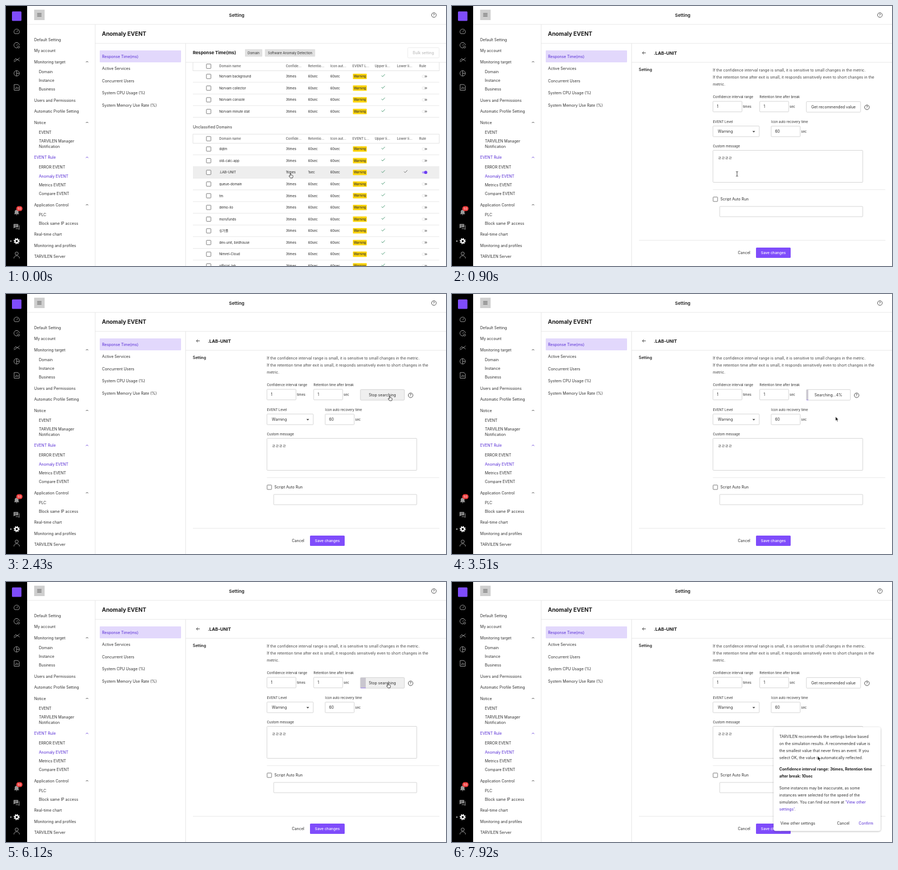
Recreate the animation shown at these times as an HTML page. Size 812 by 480 pixels, loop 8 s.

```html
<!DOCTYPE html>
<html lang="en">
<head>
<meta charset="utf-8">
<title>Setting</title>
<style>
html, body { margin: 0; width: 100%; height: 100%; overflow: hidden; background: #fff; }
svg { display: block; font-family: Inter, "Noto Sans CJK KR", "Noto Sans CJK", sans-serif; }
</style>
</head>
<body>
<svg id="stage" width="812" height="480" viewBox="0 0 812 480"></svg>
<script>
const LOOP = 8000;
const INK = '#303030', VIOLET = '#5429d4', ACCENT = '#7f4cfb', RULE = '#e2e2e2', EDGE = '#cacaca';
const BODY = 7.07, SMALL = 6.08, HEAD = 8.2;

// y is the middle of the capitals
const text = (x, y, s, o = {}) => {
  const size = o.size || BODY;
  return `<text x="${x}" y="${(y + size * 0.36).toFixed(2)}" font-size="${size}" fill="${o.fill || INK}"` +
    ` font-weight="${o.weight || 400}" text-anchor="${o.anchor || 'start'}"${o.id ? ` id="${o.id}"` : ''}>${s}</text>`;
};
const rect = (x, y, w, h, fill, extra = '') =>
  `<rect x="${x}" y="${y}" width="${w}" height="${h}" fill="${fill}" ${extra}/>`;
const frame = (x, y, w, h, stroke = EDGE, r = 1) =>
  rect(x, y, w, h, '#fff', `stroke="${stroke}" stroke-width=".8" rx="${r}"`);
const path = (d, stroke, w = 1, extra = '') =>
  `<path d="${d}" fill="none" stroke="${stroke}" stroke-width="${w}" ${extra}/>`;
const rule = (x, y, w) => rect(x, y - 0.4, w, 0.8, RULE);
const box = (x, y) => rect(x - 4.1, y - 4.1, 8.2, 8.2, '#fff', 'stroke="#6c6c6c" stroke-width=".9" rx=".8"');
const help = (x, y) =>
  `<circle cx="${x}" cy="${y}" r="4.3" fill="none" stroke="#3c3c3c" stroke-width=".9"/>` +
  text(x, y, '?', { size: 6.2, anchor: 'middle', weight: 500 });

function rail() {
  const g = '#9a9a9a';
  return rect(0, 0, 39, 480, '#000') + rect(11, 10, 17.5, 17.5, ACCENT, 'rx="1.5"') +
    path('M16 51a5 5 0 1 1 7.4 0zM19.7 48l2.3-3', g) +
    path('M21 77.2a5 5 0 1 1 3.6-5M19.5 73l2-2.5', g) +
    `<circle cx="23.2" cy="75.8" r="1.8" fill="none" stroke="${g}"/>` +
    path('M14.5 101l3.5-4 3 2.5 4-4M14.5 103l4-2 2.5-3 4 4', g) +
    `<circle cx="19.7" cy="124.3" r="5" fill="none" stroke="${g}"/>` + path('M19.7 119.3v10M19.7 124.3h5', g) +
    path('M15 145h7l2.5 2.5v8H15zM17.5 153v-2M19.7 153v-4M22 153v-3', g) +
    `<path d="M14.8 384.2l1.3-1.8v-2.6a3.5 3.5 0 0 1 7 0v2.6l1.3 1.8zM18.3 385h2.7a1.4 1.4 0 0 1-2.7 0z" fill="${g}"/>` +
    rect(19, 369.5, 11.5, 9, '#ee3d3d', 'rx="4.5"') +
    text(24.8, 374, '50', { size: 5.3, fill: '#fff', anchor: 'middle' }) +
    `<path d="M14 402.5h8.5v6H17l-3 2z" fill="${g}"/>` + path('M24.3 405v7.5l-2-1.5h-4.5', g) +
    path('M15.5 404.6h5.5M15.5 406.5h4', '#000', 0.6) +
    '<circle cx="9" cy="434" r="1.1" fill="#fff"/><circle cx="19.7" cy="434" r="3.1" fill="none" stroke="#fff" stroke-width="2.2"/>' +
    '<circle cx="19.7" cy="434" r="4.8" fill="none" stroke="#fff" stroke-width="1.7" stroke-dasharray="1.9 1.87"/>' +
    `<circle cx="19.7" cy="457" r="2.9" fill="none" stroke="${g}"/>` + path('M14.6 466c0-3.5 2.5-5 5.1-5s5.1 1.5 5.1 5', g);
}

// label, middle, level (0 top, 1 child, 2 open parent), coloured
const MENU = [
  ['Default Setting', 62, 0], ['My account', 82.5, 0], ['Monitoring target', 103, 2], ['Domain', 121.2, 1],
  ['Instance', 137.5, 1], ['Business', 153.5, 1], ['Users and Permissions', 174, 0],
  ['Automatic Profile Setting', 194.5, 0], ['Notice', 215, 2], ['EVENT', 233.2, 1],
  ['TARVILEN Manager', 249.4, 1], ['Notification', 259, 1], ['EVENT Rule', 279.5, 2, 1],
  ['ERROR EVENT', 297.7, 1], ['Anomaly EVENT', 314, 1, 1], ['Metrics EVENT', 330.2, 1],
  ['Compare EVENT', 346.5, 1], ['Application Control', 367, 2], ['PLC', 385, 1],
  ['Block same IP access', 401.2, 1], ['Real-time chart', 421.7, 0],
  ['Monitoring and profiles', 442.2, 0], ['TARVILEN Server', 462.6, 0]
];

function shell() {
  let s = rail() + rect(52, 6.8, 19.3, 19.2, '#cfcfcf') +
    path('M57.5 13.8h8M57.5 16.4h8M57.5 19h8', '#444', 0.9) +
    text(425.7, 16.7, 'Setting', { size: HEAD, weight: 600, anchor: 'middle', fill: '#1c1c1c' }) + help(789.7, 16.7) +
    rule(39, 34, 773) + rect(164, 34, 0.8, 446, RULE) + rule(164, 69, 648) + rect(331, 69, 0.8, 411, RULE) +
    text(177, 51.5, 'Anomaly EVENT', { size: 10.25, weight: 700, fill: '#1c1c1c' });
  for (const [label, y, level, on] of MENU) {
    const fill = on ? VIOLET : INK;
    s += text(level === 1 ? 60.7 : 52, y, label, { fill });
    if (level === 2) s += path(`M147.6 ${y + 1}l2-2 2 2`, fill, 0.9);
  }
  s += rect(173, 82, 150, 22, '#e2d8fc', 'rx="1"');
  ['Response Time(ms)', 'Active Services', 'Concurrent Users', 'System CPU Usage (%)', 'System Memory Use Rate (%)']
    .forEach((label, i) => { s += text(177.3, 93.3 + i * 22.5, label, { size: 7.12, fill: i ? INK : VIOLET }); });
  return s;
}

const COLS = [393.5, 516.4, 557.4, 598.5, 639.3, 680.4, 721.4, 762.6];
const TITLES = ['Domain name', 'Confide...', 'Retentio...', 'Icon aut...', 'EVENT L...', 'Upper li...', 'Lower li...', 'Rule'];
const tick = (x, y, c) => path(`M${x - 3} ${y - 0.8}l2 2.1 4.2-4.4`, c, 1);

function tableHead(y) {
  return frame(345, y - 8.3, 454.5, 16.6, '#dcdcdc', 0) + box(374, y) +
    TITLES.map((t, i) => text(COLS[i], y, t, { size: SMALL, weight: 600, fill: '#707070' })).join('');
}

function tableRow(name, y) {
  const on = name === '.LAB-UNIT';
  let s = (on ? rect(345, y - 10.8, 454.5, 21.5, '#eeeeee') : '') + rule(345, y + 10.8, 454.5) + box(374, y);
  [name, on ? '1times' : '3times', on ? '1sec' : '60sec', '60sec']
    .forEach((v, i) => { s += text(COLS[i], y, v, { size: SMALL, fill: '#262626' }); });
  s += rect(640.2, y - 5, 25.6, 10, '#ffd60d', 'rx="1"') +
    text(653, y, 'Warning', { size: 5.7, anchor: 'middle', weight: 500 }) + tick(696, y - 0.8, '#4a9a74');
  if (on) {
    s += tick(737.5, y - 0.8, '#6c6c6c') + rect(767.8, y - 2, 9, 4, '#b79cff', 'rx="2"') +
      `<circle cx="774.6" cy="${y}" r="2.9" fill="#6a3df0"/>`;
  } else {
    s += rect(768.5, y - 1.8, 8.8, 3.6, '#a8a8a8', 'rx="1.8"') +
      `<circle cx="770.4" cy="${y}" r="2.5" fill="#fff" stroke="#d0d0d0" stroke-width=".5"/>`;
  }
  return s;
}

function listView() {
  const step = 21.58;
  let s = tableHead(111.2);
  ['background', 'collector', 'console', 'minute stat']
    .forEach((n, i) => { s += tableRow('Norvam ' + n, 130 + i * step); });
  s += text(345, 223.3, 'Unclassified Domains') + tableHead(245);
  ['dqtm', 'old-calc-app', '.LAB-UNIT', 'queue-domain', 'tm', 'demo-lio', 'morufunds', '싱가폴',
    'dev-unit, birdhouse', 'Nimrel-Cloud', 'official-lab']
    .forEach((n, i) => { s += tableRow(n, 264 + i * step); });
  return s + rect(332, 70, 480, 34, '#fff') + rule(331, 104, 481) +
    text(344.7, 86.5, 'Response Time(ms)', { size: HEAD, weight: 700, fill: '#1c1c1c' }) +
    rect(441, 79.8, 32, 13.6, '#e0e0e0', 'rx="1"') + text(457, 86.6, 'Domain', { size: SMALL, anchor: 'middle' }) +
    rect(477.8, 79.8, 92.7, 13.6, '#e0e0e0', 'rx="1"') +
    text(524.2, 86.6, 'Software Anomaly Detection', { size: SMALL, anchor: 'middle' }) +
    frame(741.3, 76.8, 58, 19, '#e6e6e6', 2) + text(770.3, 86.5, 'Bulk setting', { anchor: 'middle', fill: '#b4b4b4' });
}

function field(x, y, value, unit) {
  return frame(x, y, 53.5, 19.4) + text(x + 7.2, y + 9.7, value) + text(x + 55.3, y + 10, unit, { size: SMALL });
}

function formView() {
  const label = (x, y, s) => text(x, y, s, { size: SMALL });
  return rule(331, 104, 481) + path('M357.6 86.6h-6M354 83.9l-2.7 2.7 2.7 2.7', '#333', 0.9) +
    text(372.6, 86.6, '.LAB-UNIT', { size: HEAD, weight: 700, fill: '#1c1c1c' }) +
    text(344.8, 117, 'Setting', { weight: 600, fill: '#1c1c1c' }) +
    ['If the confidence interval range is small, it is sensitive to small changes in the metric.',
      'If the retention time after exit is small, it responds sensitively even to short changes in the', 'metric.']
      .map((s, i) => text(481.3, 118.8 + i * 12.9, s, { fill: '#464646' })).join('') +
    label(481.4, 168, 'Confidence interval range') + label(567.6, 168, 'Retention time after break') +
    field(481.6, 176, '1', 'times') + field(567.8, 176, '1', 'sec') +
    `<rect id="btn" x="654" y="176.4" height="19.6" rx="1.5" stroke="${EDGE}" stroke-width=".8"/>` +
    `<rect id="bar" x="654.2" y="176.8" height="18.8" fill="#c9c6cf"/><rect id="barLine" x="654.2" y="195.2" height=".9" fill="#9b7cf5"/>` +
    text(0, 186.2, '', { id: 'btnText', anchor: 'middle' }) + `<g id="tip">${help(0, 187)}</g>` +
    label(481.4, 213.8, 'EVENT Level') + label(589, 213.8, 'Icon auto recovery time') +
    frame(481.6, 221.6, 85.4, 19.6) + text(490.6, 231.8, 'Warning') + '<path d="M554.4 230.8h5l-2.5 2.6z" fill="#444"/>' +
    field(589, 221.8, '60', 'sec') + label(481.4, 258.4, 'Custom message') +
    frame(481.6, 266.5, 276.4, 59) + text(490.8, 280, 'ㄹㄹㄹㄹ', { weight: 500 }) + rule(481.5, 339, 318) +
    box(486, 356.8) + text(495.3, 356.8, 'Script Auto Run') + frame(494, 370, 264, 19) +
    rule(345, 432.5, 455) + text(539, 455.6, 'Cancel', { anchor: 'middle' }) +
    rect(561, 446, 64, 19, ACCENT, 'rx="1.5"') +
    text(593, 455.6, 'Save changes', { size: 6.85, weight: 500, fill: '#fff', anchor: 'middle' });
}

function dialog() {
  const lines = (list, y, o) => list.map((s, i) => text(604, y + i * 13, s, o)).join('');
  const link = s => `<tspan fill="${VIOLET}">${s}</tspan>`;
  return rect(593.5, 268, 197.5, 191.5, '#fff', 'rx="4" filter="url(#shade)"') +
    lines(['TARVILEN recommends the settings below based', 'on the simulation results. A recommended value is',
      'the smallest value that never fires an event. If you', 'select OK, the value is automatically reflected.'], 285) +
    lines(['Confidence interval range: 3times, Retention time', 'after break: 10sec'], 345.5, { weight: 700, fill: '#1c1c1c' }) +
    lines(['Some instances may be inaccurate, as some', 'instances were selected for the speed of the',
      'simulation. You can find out more at ' + link("'View other"), link("settings'") + '.'], 380) +
    text(606, 445.7, 'View other settings') + text(722, 445.7, 'Cancel', { anchor: 'middle' }) +
    text(764, 445.7, 'Confirm', { anchor: 'middle', fill: VIOLET });
}

const POINTERS = {
  arrow: '<path d="M0 0v7.6l1.8-1.6 1.2 3 1.4-.6-1.2-2.9h2.3z" fill="#111" stroke="#fff" stroke-width=".6"/>',
  hand: '<path d="M-.7-.2q.7-1 1.4 0v3l3 .7q1.2.4.9 1.8l-.8 3.2h-4L-2.7 5.2q0-1.3 1.2-.7l.8.8z" fill="#fff" stroke="#222" stroke-width=".8" stroke-linejoin="round"/>',
  beam: path('M-1.9-4.4q1.9 0 1.9 1.2 0-1.2 1.9-1.2M0-3.4v6.8M-1.9 4.4q1.9 0 1.9-1.2 0 1.2 1.9 1.2', '#333', 0.9)
};

const svg = document.getElementById('stage');
svg.innerHTML = '<defs><filter id="shade" x="-10%" y="-10%" width="120%" height="120%">' +
  '<feDropShadow dx="0" dy=".8" stdDeviation="1.6" flood-color="#000" flood-opacity=".35"/></filter></defs>' +
  rect(0, 0, 812, 480, '#fff') + shell() +
  `<g id="list">${listView()}</g><g id="form">${formView()}</g><g id="dialog">${dialog()}</g><g id="pointer">` +
  Object.keys(POINTERS).map(k => `<g id="${k}">${POINTERS[k]}</g>`).join('') + '</g>';
const el = id => document.getElementById(id);
const show = (id, on) => el(id).setAttribute('display', on ? 'inline' : 'none');
const set = (id, k, v) => el(id).setAttribute(k, v);

const OPEN = 900, CLICK = 2070, DONE = 6930;
const TRACK = [ // time, x, y of the pointer's hot spot
  [0, 525, 309], [270, 525, 309], [720, 526, 310], [900, 526, 310], [1930, 707, 188.5], [2430, 708, 188.5],
  [2970, 708.5, 266], [3150, 708.5, 266], [3510, 707.8, 226.5], [3870, 708, 227.5], [4680, 709.8, 246],
  [5400, 709.8, 246], [5940, 705, 187], [6130, 705, 187], [6480, 633, 385], [6930, 633, 385],
  [7650, 703, 217], [7920, 675, 321.5], [LOOP, 675, 321.5]
];
const clamp = v => Math.max(0, Math.min(1, v));
const ease = v => v * v * (3 - 2 * v);

function pointerAt(t) {
  const i = TRACK.findIndex((p, n) => n && t <= p[0]);
  const [a, x, y] = TRACK[i - 1], [b, X, Y] = TRACK[i];
  const u = ease((t - a) / (b - a));
  return [x + (X - x) * u, y + (Y - y) * u];
}

// The search reports 4 % more every 1260 ms, the bar glides after it
const POLLS = [3150, 4410, 5670];
const percent = t => 4 * POLLS.filter(p => t >= p).length;
const barWidth = t => POLLS.reduce((w, p) => w + 3.25 * ease(clamp((t - p) / 360)), 0);

function draw(t) {
  const form = t >= OPEN, busy = t >= CLICK && t < DONE, done = t >= DONE;
  const [x, y] = pointerAt(t);
  const inside = (l, r, top, bottom) => x >= l && x <= r && y >= top && y <= bottom;
  const w = busy ? 81.2 : 100;
  const hover = form && inside(654, 654 + w, 176, 196);
  const typing = form && !(done && inside(593, 791, 268, 460)) &&
    (inside(482, 758, 266, 326) || inside(494, 758, 370, 389) || inside(589, 643, 222, 241));
  const kind = !form || hover ? 'hand' : typing ? 'beam' : 'arrow';

  show('list', !form);
  show('form', form);
  show('dialog', done);
  set('btn', 'width', w);
  set('btn', 'fill', hover ? '#efefef' : '#fff');
  const bw = busy ? barWidth(t) : 0;
  set('bar', 'width', bw);
  set('barLine', 'width', bw);
  set('btnText', 'x', 654 + w / 2);
  el('btnText').textContent = !busy ? 'Get recommended value' : hover ? 'Stop searching' : `Searching...${percent(t)}%`;
  set('tip', 'transform', `translate(${busy ? 746.7 : 765.8} 0)`);
  for (const k in POINTERS) show(k, k === kind);
  set('pointer', 'transform', `translate(${x.toFixed(2)} ${y.toFixed(2)})`);
}

function tickFrame() {
  draw(performance.now() % LOOP);
  requestAnimationFrame(tickFrame);
}
tickFrame();
</script>
</body>
</html>
```
